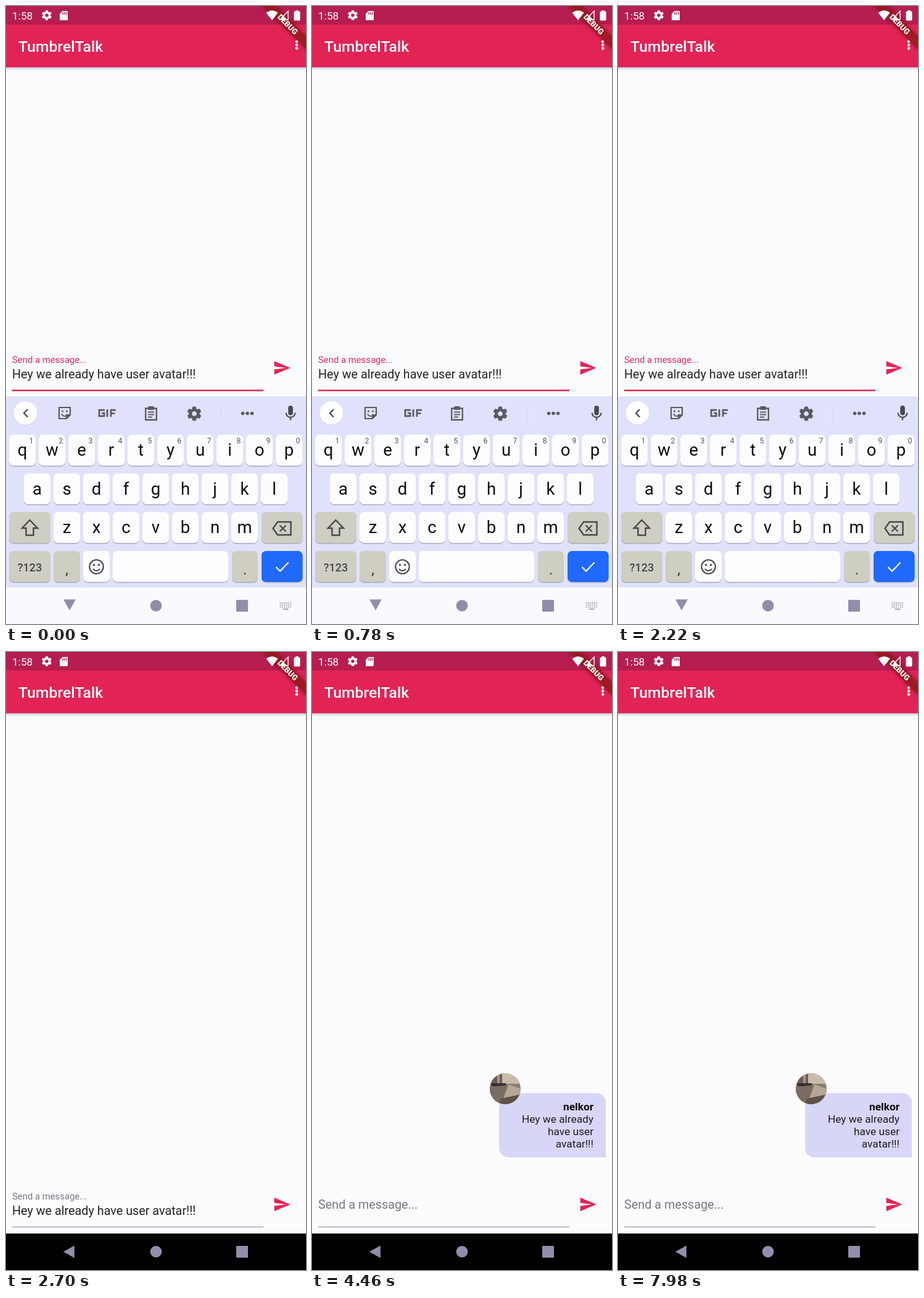
An HTML page with a canvas that plays this animation: 486 by 999 pixels, repeating every 8000 ms.

```html
<!DOCTYPE html>
<html lang="en">
<head>
<meta charset="utf-8">
<title>Chat message</title>
<style>
html, body { margin: 0; width: 100%; height: 100%; overflow: hidden; background: #fcfcfe; }
canvas { display: block; width: 486px; height: 999px; }
</style>
</head>
<body>
<canvas id="stage" width="486" height="999"></canvas>
<script>
const g = document.getElementById('stage').getContext('2d');
const LOOP = 8000, HIDE = 2280, HIDE_LEN = 180, SENT = 3020;
const FONT = 'Roboto, sans-serif';
const PINK = '#e62357', PAGE = '#fcfcfe', KEY_INK = '#0c0c0e', TOOL = '#5b5a60', NAV = '#908eab';
const TAU = Math.PI * 2;

const clamp = x => Math.max(0, Math.min(1, x));
const ease = x => { x = clamp(x); return x * x * (3 - 2 * x); };
const mix = (a, b, k) => a + (b - a) * k;
const blend = (a, b, k) => `rgb(${a.map((v, i) => Math.round(mix(v, b[i], k)))})`;

function text(s, x, y, size, color, weight = 400, align = 'left') {
  g.font = `${weight} ${size}px ${FONT}`;
  g.fillStyle = color;
  g.textAlign = align;
  g.fillText(s, x, y);
}
function rect(x, y, w, h, color) {
  g.fillStyle = color;
  g.fillRect(x, y, w, h);
}
function round(x, y, w, h, r, color) {
  g.fillStyle = color;
  g.beginPath();
  g.roundRect(x, y, w, h, r);
  g.fill();
}
function disc(x, y, r, color) {
  g.fillStyle = color;
  g.beginPath();
  g.arc(x, y, r, 0, TAU);
  g.fill();
}
function poly(points, color) {
  g.fillStyle = color;
  g.beginPath();
  points.forEach(p => g.lineTo(...p));
  g.closePath();
  g.fill();
}
function line(points, color, width, closed) {
  g.strokeStyle = color;
  g.lineWidth = width;
  g.beginPath();
  points.forEach(p => g.lineTo(...p));
  if (closed) g.closePath();
  g.stroke();
}
function arc(x, y, r, from, to, color, width) {
  g.strokeStyle = color;
  g.lineWidth = width;
  g.beginPath();
  g.arc(x, y, r, from, to);
  g.stroke();
}
// Draws in coordinates centred on (x, y).
function at(x, y, draw, turn = 0) {
  g.save();
  g.translate(x, y);
  g.rotate(turn);
  draw();
  g.restore();
}

function gear(x, y, r, color) {
  at(x, y, () => {
    arc(0, 0, r * .54, 0, TAU, color, r * .42);
    for (let i = 0; i < 6; i++) {
      g.rotate(TAU / 6);
      poly([[-r * .34, -r * .6], [-r * .22, -r], [r * .22, -r], [r * .34, -r * .6]], color);
    }
  });
}

function header() {
  rect(0, 0, 486, 30, '#b61d50');
  rect(0, 30, 486, 69, '#e22355');
  const shade = g.createLinearGradient(0, 99, 0, 104);
  shade.addColorStop(0, '#c9c4dc');
  shade.addColorStop(1, PAGE);
  rect(0, 99, 486, 5, shade);
  text('TumbrelTalk', 20, 74, 24.75, '#fff', 500);
  [57.5, 63, 68.5].forEach(y => disc(471, y, 2.3, '#fff'));

  at(486, 0, () => {
    g.shadowColor = 'rgba(0,0,0,.4)';
    g.shadowBlur = 6;
    rect(-50, 34.6, 100, 14.9, 'rgba(160,27,28,.8)');
    g.shadowBlur = 0;
    text('DEBUG', 0, 46.3, 12.6, '#fff', 900, 'center');
  }, Math.PI / 4);

  text('1:58', 10, 21.5, 17.3, '#fff');
  gear(66, 15, 8, '#fff');
  poly([[91.5, 8], [100, 8], [100, 23], [87, 23], [87, 12.5]], '#fff');
  [91.5, 94.3, 97.1].forEach(x => rect(x, 10, 1.4, 4, '#b61d50'));
  g.fillStyle = '#fff';
  g.beginPath();
  g.moveTo(431, 23);
  g.lineTo(421.5, 11);
  g.quadraticCurveTo(431, 3.5, 440.5, 11);
  g.fill();
  line([[457, 8], [457, 22], [444, 22]], '#fff', 1.4, true);
  poly([[451, 15], [451, 22], [444, 22]], '#fff');
  round(466.5, 8.5, 10, 15, 1.5, '#fff');
  rect(469.3, 7, 4.4, 2, '#fff');
}

function sendIcon(y) {
  at(447, y, () => poly([[-12.4, 11.1], [13.6, 0], [-12.4, -11.1], [-12.4, -2.5], [6.2, 0], [-12.4, 2.5]], PINK));
}

function inputRow(t) {
  const dy = t < HIDE ? 0 : 308;
  const blur = ease((t - HIDE) / 200);
  const rest = ease((t - SENT) / 200);
  const label = blend([228, 40, 92], [121, 119, 126], blur);
  text('Send a message...', 10, mix(577, 592, rest) + dy, mix(14.85, 19.8, rest), label);
  if (t < SENT) text('Hey we already have user avatar!!!', 10, 602 + dy, 19.8, '#232325');
  const thick = mix(2.4, 1.2, blur);
  rect(10, 621.4 + dy - thick / 2, 407, thick, blend([216, 36, 76], [150, 148, 158], blur));
  sendIcon(585 + dy);
}

function bubble() {
  round(303, 713, 173, 104, [15, 15, 0, 15], '#d8d6f7');
  text('nelkor', 456, 741, 17.3, '#0a0a0c', 700, 'right');
  ['Hey we already', 'have user', 'avatar!!!'].forEach((s, i) =>
    text(s, 456, 761 + i * 20, 17.3, '#1b1b20', 400, 'right'));

  g.save();
  g.beginPath();
  g.arc(313, 706, 25, 0, TAU);
  g.clip();
  rect(288, 681, 50, 50, '#8c7c70');
  rect(288, 681, 20, 20, '#6d5a55');
  rect(308, 681, 30, 17, '#c8bba9');
  rect(300, 683, 4, 16, '#a9958c');
  rect(291, 697, 23, 5, '#382f35');
  poly([[288, 703], [318, 700], [306, 731], [288, 731]], '#786c63');
  poly([[318, 699], [338, 706], [338, 719], [310, 722]], '#b5a795');
  poly([[306, 722], [338, 715], [338, 731], [302, 731]], '#5d5149');
  g.restore();
}

function toolbar() {
  disc(31.5, 659, 19, 'rgba(90,90,130,.18)');
  disc(31.5, 658, 19, '#fff');
  line([[35, 652], [29, 658.3], [35, 664.6]], '#46454b', 2.2);

  at(95, 658, () => {
    line([[-9, -9], [9, -9], [9, 3], [3, 9], [-9, 9]], TOOL, 2.2, true);
    poly([[9, 2], [2, 2], [2, 9]], TOOL);
    disc(-3.5, -3, 1.5, TOOL);
    disc(3.5, -3, 1.5, TOOL);
    arc(0, 0, 5, .9, 2.9, TOOL, 1.8);
  });

  at(164, 658, () => {
    line([[-4, -4.8], [-13, -4.8], [-13, 4.8], [-5, 4.8], [-5, 0], [-9, 0]], TOOL, 2.7);
    line([[0, -6], [0, 6]], TOOL, 2.8);
    line([[14, -4.8], [6, -4.8], [6, 6]], TOOL, 2.7);
    line([[6, .5], [12.5, .5]], TOOL, 2.5);
  });

  at(235, 659, () => {
    line([[-8.8, -8.5], [8.8, -8.5], [8.8, 10], [-8.8, 10]], TOOL, 2.3, true);
    round(-5, -12, 10, 6, 2, TOOL);
    line([[-5, -2.5], [5, -2.5]], TOOL, 1.9);
    line([[-5, 1.5], [5, 1.5]], TOOL, 1.9);
    line([[-5, 5.5], [2, 5.5]], TOOL, 1.9);
  });

  gear(305, 659, 11.5, TOOL);
  rect(348, 645, 1, 27, '#d2d5ef');
  [383.5, 391, 398.5].forEach(x => disc(x, 658.5, 2.8, TOOL));

  at(461, 658, () => {
    round(-3.8, -12, 7.6, 15.5, 3.8, '#49484e');
    arc(0, -.5, 7.4, 0, Math.PI, '#49484e', 2.1);
    line([[0, 7], [0, 11.5]], '#49484e', 2.2);
  });
}

function key(x, y, w, color = '#fdfdff') {
  round(x, y + 1.4, w, 50, 7, 'rgba(85,85,105,.4)');
  round(x, y, w, 50, 7, color);
}

function letters(row, left, y) {
  [...row].forEach((c, i) => {
    const x = left + i * 48;
    key(x, y, 43);
    text(c, x + 21.5, y + 34, 27.5, KEY_INK, 400, 'center');
  });
}

function keyboard() {
  const gray = '#cfcec3';
  rect(0, 631, 486, 309, '#dfe2fa');
  toolbar();
  letters('qwertyuiop', 5, 693);
  [...'1234567890'].forEach((c, i) => text(c, 41 + i * 48, 707, 12.3, '#56555c', 400, 'center'));
  letters('asdfghjkl', 29, 755.5);
  letters('zxcvbnm', 77, 818);

  key(5, 818, 67, gray);
  line([[38.5, 831], [51, 844], [44.5, 844], [44.5, 855.5], [32.5, 855.5], [32.5, 844], [26, 844]], '#49484c', 2.4, true);
  key(414, 818, 66.5, gray);
  line([[440, 834], [461.5, 834], [461.5, 855], [440, 855], [432.5, 844.5]], '#49484c', 2.4, true);
  line([[443.5, 839.5], [453.5, 849.5]], '#49484c', 2.3);
  line([[453.5, 839.5], [443.5, 849.5]], '#49484c', 2.3);

  key(5, 881, 67, gray);
  text('?123', 38.5, 913.5, 18, '#46454b', 500, 'center');
  key(77, 881, 43, gray);
  text(',', 98.5, 919, 23, '#2c2b30', 400, 'center');
  key(125, 881, 43);
  at(146.5, 906.5, () => {
    arc(0, 0, 11.2, 0, TAU, '#46454b', 2.1);
    disc(-4, -3, 1.7, '#46454b');
    disc(4, -3, 1.7, '#46454b');
    arc(0, .5, 6, .45, Math.PI - .45, '#46454b', 2);
  });
  key(173, 881, 187);
  key(366, 881, 42, gray);
  text('.', 387, 919, 23, '#2c2b30', 400, 'center');
  key(414, 881, 66.5, '#1f69fb');
  line([[437.5, 907], [444, 913.5], [457.5, 899.5]], '#fff', 2.3);
}

function navBar(t) {
  const k = ease((t - HIDE) / HIDE_LEN);
  const spin = ease((t - HIDE - 40) / 220);
  rect(0, 940, 486, 59, blend([250, 250, 254], [0, 0, 0], k));
  at(mix(103, 102, spin), mix(968, 969.5, spin), () =>
    poly([[-10, -8.8], [10, -8.8], [0, 9]], NAV), spin * Math.PI / 2);
  disc(243, 969.3, 9.4, NAV);
  round(373, 960, 19, 19, 1, NAV);
  g.globalAlpha = 1 - k;
  for (let y = 0; y < 3; y++)
    for (let x = 0; x < 6; x++) rect(443.5 + x * 3.3, 964 + y * 3.3, 1.9, 1.9, '#a3a1b4');
  rect(448.5, 974, 9, 1.8, '#a3a1b4');
  g.globalAlpha = 1;
}

function draw(t) {
  rect(0, 0, 486, 999, PAGE);
  if (t >= SENT) bubble();
  inputRow(t);
  header();
  const out = clamp((t - HIDE) / HIDE_LEN);
  if (out < 1) {
    g.save();
    g.globalAlpha = 1 - out * out;
    g.translate(0, 309 * out * out);
    keyboard();
    g.restore();
  }
  navBar(t);
}

const start = performance.now();
function tick() {
  draw((performance.now() - start) % LOOP);
  requestAnimationFrame(tick);
}
tick();
</script>
</body>
</html>
```
